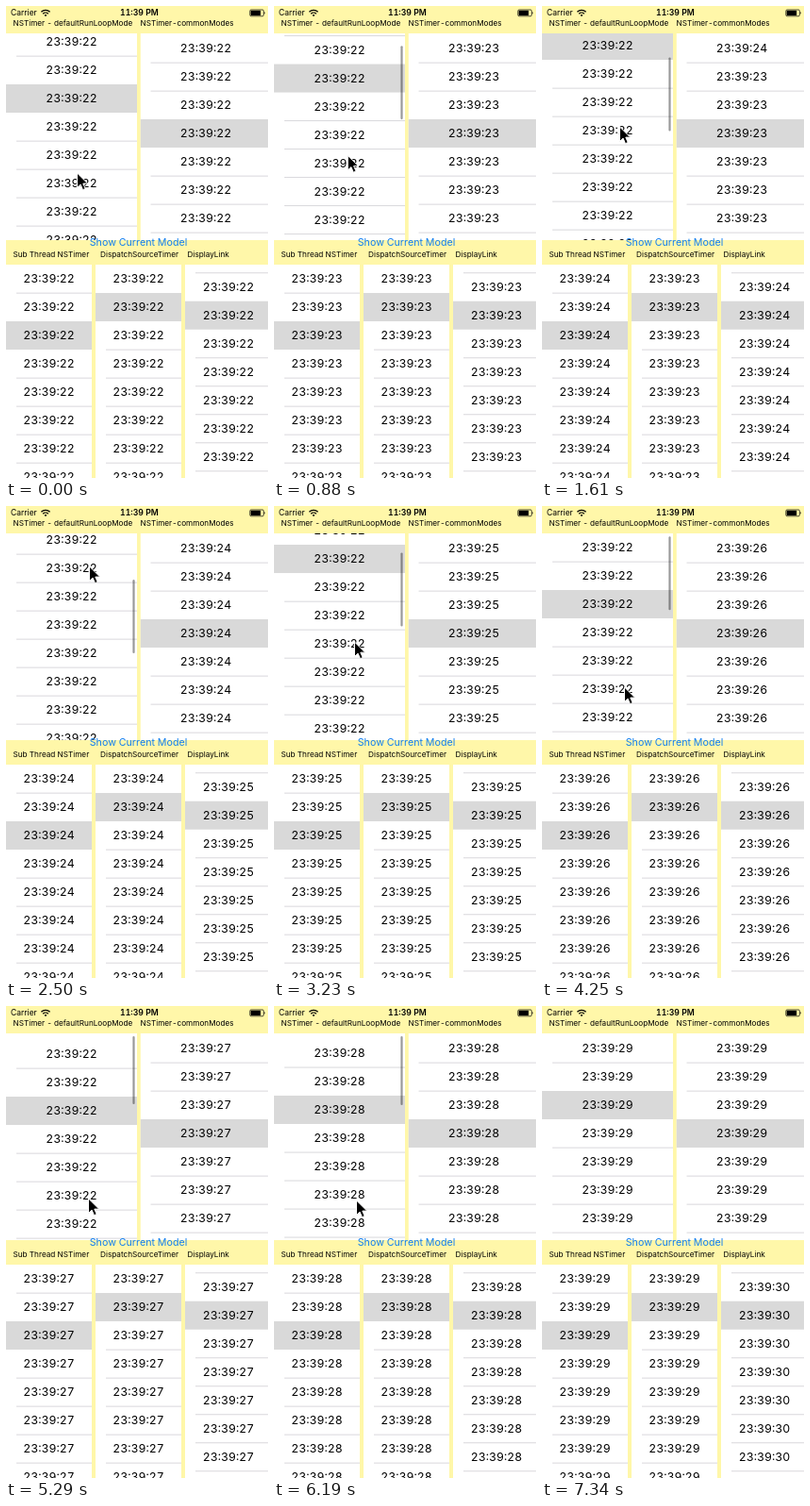
Write an HTML page that moves like this. It is 278 by 500 pixels and loops after 7440 ms.

```html
<!DOCTYPE html>
<html lang="en">
<head>
<meta charset="utf-8">
<title>Timer lists</title>
<style>
  html, body { margin: 0; width: 100%; height: 100%; overflow: hidden; background: #fff7a9; }
  svg { display: block; }
  text { font-family: Inter, Roboto, sans-serif; font-feature-settings: "tnum"; }
  .cell { font-size: 12.3px; text-anchor: middle; }
  .title { font-size: 8.2px; }
</style>
</head>
<body>
<svg id="stage" width="100%" height="100%" viewBox="0 0 278 500">
  <rect width="278" height="500" fill="#fff7a9"/>
  <g id="lists"></g>
  <g id="bar">
    <text x="5" y="10.3" font-size="8.5">Carrier</text>
    <g fill="none" stroke="#000" stroke-width="1.3">
      <path d="M37.4 6.3a6.6 6.6 0 0 1 9.2 0"/>
      <path d="M39.2 8.2a4 4 0 0 1 5.6 0"/>
    </g>
    <path d="M40.6 9.6a2 2 0 0 1 2.8 0L42 11.2z"/>
    <text x="141.5" y="10.3" font-size="8.7" font-weight="600" text-anchor="middle">11:39 PM</text>
    <rect x="258.8" y="4" width="14.6" height="6.8" rx="1.3" fill="none" stroke="#000" stroke-width=".7"/>
    <rect x="259.6" y="4.8" width="10.6" height="5.2" rx=".6"/>
    <path d="M274.4 6.1q1.4 1.3 0 2.6z"/>
  </g>
  <text x="140.5" y="253.6" font-size="10.7" fill="#127fee" text-anchor="middle">Show Current Model</text>
  <g id="titles"></g>
  <path id="cursor" d="M0 0V15.4L3.6 12.1L6 17.7L8.7 16.5L6.3 11.1H11.2Z" stroke="#fff" stroke-width="1"/>
</svg>
<script>
const NS = 'http://www.w3.org/2000/svg';
const LOOP = 7440, TICK = 146.7, ROW = 30, RELEASE = 6000;
const $ = id => document.getElementById(id);

function add(parent, tag, attrs, label) {
  const el = document.createElementNS(NS, tag);
  for (const k in attrs) el.setAttribute(k, attrs[k]);
  if (label) el.textContent = label;
  return parent.appendChild(el);
}

// Seconds shown by a 1 s timer that fires `phase` ms into each second.
const fired = (t, phase) => 23 + Math.floor((t - phase) / 1000);

const panels = [
  { title: 'NSTimer - defaultRunLoopMode', tx: 7.5, ty: 21,
    x: 0, y: 29, w: 139, h: 219, top: 30, mid: 69.5, picked: 2, rows: 13,
    sec: t => t < RELEASE ? 22 : fired(t, 600) },
  { title: 'NSTimer-commonModes', tx: 142.5, ty: 21,
    x: 142.5, y: 29, w: 135.5, h: 219, top: 30, mid: 212, picked: 3, rows: 8,
    sec: (t, row) => fired(t, row ? 620 : 600) },
  { title: 'Sub Thread NSTimer', tx: 7.5, ty: 266,
    x: 0, y: 274, w: 91, h: 226, top: 274, mid: 45.5, picked: 2, rows: 8,
    sec: t => fired(t, 600) },
  { title: 'DispatchSourceTimer', tx: 100, ty: 266,
    x: 95, y: 274, w: 91, h: 226, top: 274, mid: 140.5, picked: 1, rows: 8,
    sec: t => fired(t, 620) },
  { title: 'DisplayLink', tx: 192.5, ty: 266,
    x: 190, y: 274, w: 88, h: 226, top: 252.7, mid: 236, picked: 2, rows: 9,
    sec: t => Math.floor((t + 22670) / 1000) }
];

function buildList(p) {
  const view = add($('lists'), 'svg', { x: p.x, y: p.y, width: p.w, height: p.h, viewBox: `${p.x} ${p.y} ${p.w} ${p.h}` });
  add(view, 'rect', { x: p.x, y: p.y, width: p.w, height: p.h, fill: '#fff' });
  p.body = add(view, 'g', {});
  p.cells = [];
  for (let i = 0; i < p.rows; i++) {
    const y = p.top + i * ROW;
    if (i === p.picked)
      add(p.body, 'rect', { x: p.x, y, width: p.w, height: ROW, fill: '#d9d9d9' });
    else if (i + 1 !== p.picked)
      add(p.body, 'rect', { x: p.x + 11, y: y + ROW - .3, width: p.w - 11, height: .8, fill: '#cfced3' });
    p.cells.push(add(p.body, 'text', { class: 'cell', x: p.mid, y: y + 19 }));
  }
  add($('titles'), 'text', { class: 'title', x: p.tx, y: p.ty }, p.title);
  p.view = view;
}
panels.forEach(buildList);
const thumb = add(panels[0].view, 'rect', { x: 134.4, width: 2.2, rx: 1.1, fill: '#000' });

// Cubic curve through [time, value] points, flat at the turning points.
function curve(points) {
  const slope = (a, b) => (b[1] - a[1]) / (b[0] - a[0]);
  const tangents = points.map((p, i) => {
    if (!i || i === points.length - 1) return 0;
    const a = slope(points[i - 1], p), b = slope(p, points[i + 1]);
    return a * b > 0 ? 2 * a * b / (a + b) : 0;
  });
  return t => {
    if (t <= points[0][0]) return points[0][1];
    const i = points.findIndex(p => p[0] > t) - 1;
    if (i < 0) return points[points.length - 1][1];
    const [t0, v0] = points[i], [t1, v1] = points[i + 1];
    const d = t1 - t0, u = (t - t0) / d, w = 1 - u;
    return v0 * w * w * (1 + 2 * u) + v1 * u * u * (3 - 2 * u)
      + d * u * w * (w * tangents[i] - u * tangents[i + 1]);
  };
}

const scrollAt = curve([[0, 7], [1614, 63], [2494, 129], [3227, 49], [4254, 1], [5281, -6], [5720, -7], [6000, -7], [6450, 0]]);
const cursorX = curve([[0, 75.5], [1614, 82.5], [2494, 88.5], [3227, 85.5], [4254, 87.5], [6000, 87.5]]);
const cursorY = curve([[0, 177], [1614, 128], [2494, 64], [3227, 144], [4254, 192], [5281, 204], [5720, 206], [6000, 206]]);
const thumbAlpha = curve([[0, 0], [300, .4], [6160, .4], [6600, 0]]);

function draw(now) {
  // The screen refreshes in discrete ticks.
  const t = Math.floor((now % LOOP + 6) / TICK) * TICK;
  for (const p of panels)
    p.cells.forEach((cell, i) => {
      const label = '23:39:' + p.sec(t, i);
      if (cell.textContent !== label) cell.textContent = label;
    });

  const scroll = scrollAt(t);
  panels[0].body.setAttribute('transform', `translate(0 ${-scroll})`);
  thumb.setAttribute('y', 32 + Math.max(0, scroll) * .357);
  thumb.setAttribute('height', 78 + Math.min(0, scroll));
  thumb.setAttribute('opacity', thumbAlpha(t));

  $('cursor').setAttribute('transform', `translate(${cursorX(t)} ${cursorY(t)})`);
  $('cursor').setAttribute('visibility', t < 6880 ? 'visible' : 'hidden');
}

const start = performance.now();
function frame() {
  draw(performance.now() - start);
  requestAnimationFrame(frame);
}
frame();
</script>
</body>
</html>
```
